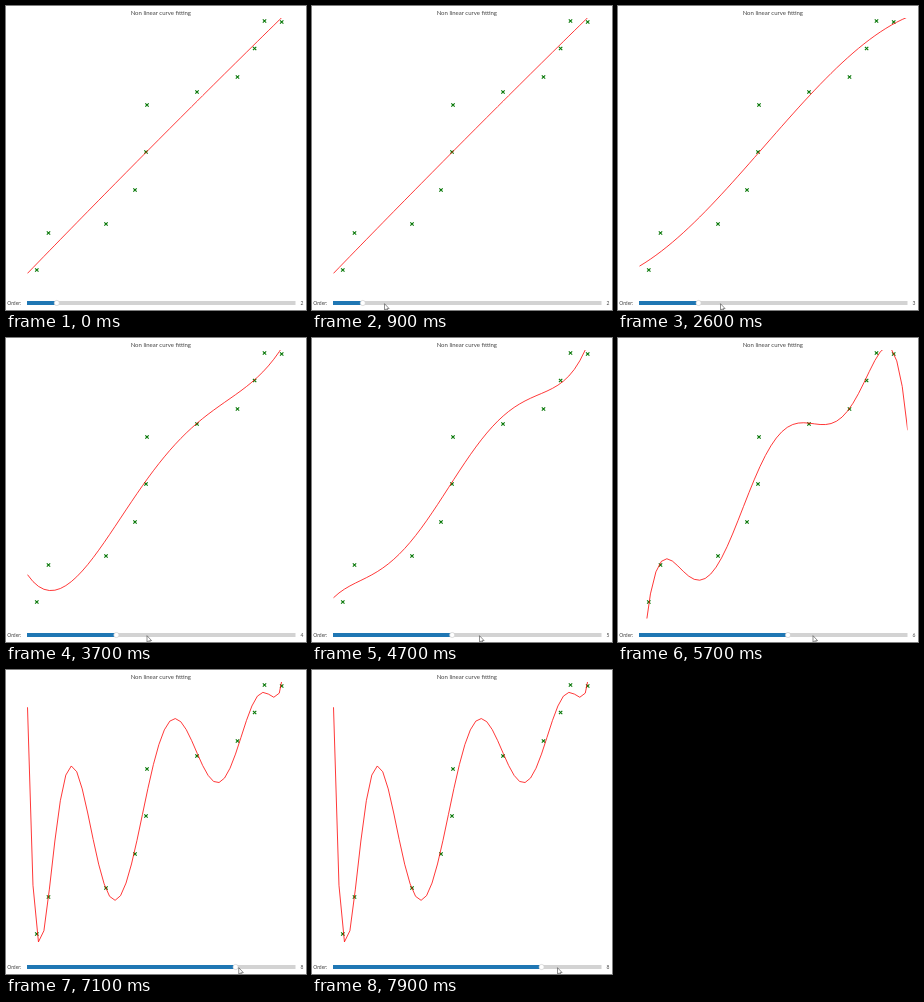
Write an HTML page that moves like this. It is 300x304 px and loops after 8 s.

```html
<!DOCTYPE html>
<html lang="en">
<head>
<meta charset="utf-8">
<title>Non linear curve fitting</title>
<style>
  html, body { margin: 0; width: 100%; height: 100%; overflow: hidden; background: #fff; }
  svg { display: block; }
  text { font: 5px Lato, sans-serif; fill: #444; }
</style>
</head>
<body>
<svg width="300" height="304" viewBox="0 0 300 304">
  <clipPath id="axes"><rect x="21" y="12" width="268.5" height="268.5"/></clipPath>
  <text x="154.8" y="9" text-anchor="middle" style="font-size:6px">Non linear curve fitting</text>
  <path id="markers" fill="none" stroke="#087808" stroke-width="1.1"/>
  <path id="curve" fill="none" stroke="#f00" stroke-opacity=".78" stroke-linejoin="round" clip-path="url(#axes)"/>
  <text x="1.2" y="298.6">Order:</text>
  <rect x="21" y="295" width="268.5" height="4" fill="#d3d3d3"/>
  <rect id="bar" x="21" y="295" height="4" fill="#1f77b4"/>
  <circle id="knob" cy="297" r="2.6" fill="#fff" stroke="#c8c8c8" stroke-width=".6"/>
  <text id="value" x="294.4" y="298.6"></text>
  <path id="cursor" d="M0 0V6.6L1.6 5.2L2.7 7.6L3.6 7.2L2.6 4.9H4.6Z" fill="#fff" stroke="#444" stroke-width=".6"/>
</svg>
<script>
const DURATION = 8000, STEP = 100, DRAG = 400, PAUSE = 100;
const LEFT = 21, UNIT = 29.8, SAMPLES = 50;
const $ = id => document.getElementById(id);

// The measured data that every curve is fitted to
const points = [
  [30.8, 264], [42.5, 227], [100, 218], [129, 184], [140, 146], [141, 99],
  [191, 86], [231.5, 71], [248.6, 42.5], [258.5, 15], [275.7, 16]
];

// Where the pointer rests: time reached, x
const stops = [
  [900, 72.5], [1700, 91.5], [2400, 102.5], [3300, 141], [4300, 167.5], [5300, 192.5],
  [5700, 195], [6500, 212], [6800, 223], [7300, 242.5], [7700, 245.5]
];

const dot = (a, b) => a.reduce((sum, v, i) => sum + v * b[i], 0);

// Least squares by polynomials that are orthogonal over the points
function fitCurve(degree) {
  const xs = Array.from({ length: SAMPLES }, (_, i) => 21.5 + 268.2 * i / (SAMPLES - 1));
  const n = points.length;
  const u = [...points.map(p => p[0]), ...xs].map(x => (x - 155) / 134);
  const ys = points.map(p => p[1]);
  let previous = u.map(() => 0), basis = u.map(() => 1), previousNorm = 1;
  const fit = u.map(() => 0);
  for (let k = 0; k <= degree; k++) {
    const known = basis.slice(0, n);
    const norm = dot(known, known);
    const weight = dot(known, ys) / norm;
    basis.forEach((b, i) => fit[i] += weight * b);
    const alpha = dot(known.map((b, i) => b * u[i]), known) / norm;
    const beta = k ? norm / previousNorm : 0;
    const next = basis.map((b, i) => (u[i] - alpha) * b - beta * previous[i]);
    [previous, basis, previousNorm] = [basis, next, norm];
  }
  return "M" + xs.map((x, i) => `${x.toFixed(2)} ${fit[n + i].toFixed(2)}`).join("L");
}

const curves = Array.from({ length: 9 }, (_, order) => fitCurve(order));

function pointerX(time) {
  let x = 66, rested = 0;
  for (const [end, target] of stops) {
    const start = Math.max(rested + PAUSE, end - DRAG);
    const k = Math.min(1, Math.max(0, (time - start) / (end - start)));
    x += (target - x) * k;
    rested = end;
  }
  return x;
}

function draw(now) {
  const time = Math.floor(now % DURATION / STEP) * STEP;
  const x = pointerX(time);
  const y = 297.7 + Math.max(0, 72.5 - x);
  const order = 1 + Math.floor((x - LEFT - 1) / UNIT);
  const knobX = LEFT + (order - 1) * UNIT;
  $("curve").setAttribute("d", curves[order]);
  $("bar").setAttribute("width", knobX - LEFT);
  $("knob").setAttribute("cx", knobX);
  $("value").textContent = order;
  $("cursor").setAttribute("transform", `translate(${x} ${y})`);
  requestAnimationFrame(draw);
}

$("markers").setAttribute("d", points.map(([x, y]) =>
  `M${x - 1.7} ${y - 1.7}l3.4 3.4m0 -3.4l-3.4 3.4`).join(""));
draw(0);
</script>
</body>
</html>
```
